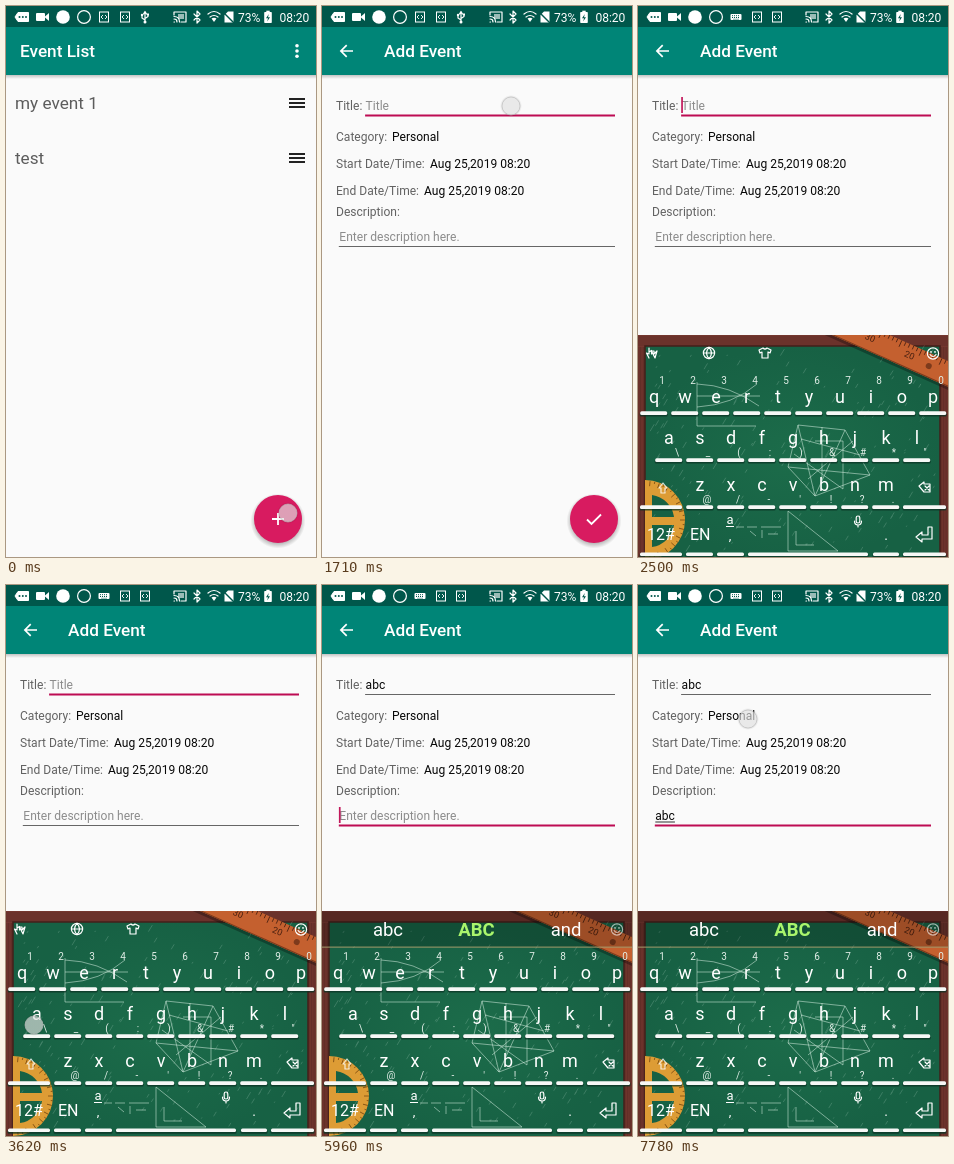
Animation of 310 by 551 pixels, one loop 8000 ms. Source, as an HTML page:

```html
<!DOCTYPE html>
<html lang="en">
<head>
<meta charset="utf-8">
<title>Event list</title>
<style>
html, body { margin: 0; width: 100%; height: 100%; overflow: hidden; background: #fafafa; }
svg { display: block; width: 100vw; height: 100vh; }
text { font-family: Roboto, "Noto Sans", sans-serif; white-space: pre; }
.line { fill: none; stroke: #fff; stroke-width: 1.2; stroke-linecap: round; stroke-linejoin: round; }
.chalk { fill: none; stroke: #d7eee2; stroke-width: .9; opacity: .6; }
#keys { --wood: #74372f; --edge: #431f1a; --ruler: #c4602f; --arc: #dd9c35; }
#keys.fade { --wood: #bb3264; --edge: #a04468; --ruler: #c23f74; --arc: #c23f74; }
</style>
</head>
<body>
<svg id="stage" viewBox="0 0 310 551">
  <defs>
    <linearGradient id="shade" x1="0" y1="0" x2="0" y2="1">
      <stop offset="0" stop-color="#000" stop-opacity=".22"/>
      <stop offset="1" stop-color="#000" stop-opacity="0"/>
    </linearGradient>
    <radialGradient id="board">
      <stop offset="0" stop-color="#1c6c4a"/>
      <stop offset="1" stop-color="#176144"/>
    </radialGradient>
    <radialGradient id="glow">
      <stop offset=".75" stop-color="#000" stop-opacity=".32"/>
      <stop offset="1" stop-color="#000" stop-opacity="0"/>
    </radialGradient>
    <clipPath id="keyClip"><rect y="326" width="310" height="225"/></clipPath>
  </defs>
  <g id="list"></g>
  <g id="form"></g>
  <g id="keys"></g>
  <g id="status"></g>
  <g id="dot">
    <circle r="11" fill="url(#glow)" opacity=".4"/>
    <circle r="9" fill="#f2f2f2" fill-opacity=".62" stroke="#bbb" stroke-opacity=".65"/>
  </g>
</svg>
<script>
const $ = id => document.getElementById(id);
const text = (x, y, s, size = 12.06, fill = '#626262', more = '') =>
  `<text x="${x}" y="${y}" font-size="${size}" fill="${fill}" ${more}>${s}</text>`;
const mid = (x, y, s, size, fill = '#fff', more = '') =>
  text(x, y, s, size, fill, 'text-anchor="middle" ' + more);
const rect = (x, y, w, h, fill, more = '') =>
  `<rect x="${x}" y="${y}" width="${w}" height="${h}" fill="${fill}" ${more}/>`;
const disc = (x, y, r, fill) => `<circle cx="${x}" cy="${y}" r="${r}" fill="${fill}"/>`;
const ring = r => `<circle r="${r}" class="line"/>`;
const path = (d, more = 'class="line"') => `<path d="${d}" ${more}/>`;
const at = (x, y, body, more = '') => `<g transform="translate(${x} ${y})" ${more}>${body}</g>`;
const range = n => [...Array(n).keys()];

function seeded(seed) {
  return () => (seed = (seed * 16807) % 2147483647) / 2147483647;
}

const appBar = (x, title) =>
  rect(0, 0, 310, 551, '#fafafa') + rect(0, 69, 310, 4, 'url(#shade)') +
  rect(0, 0, 310, 21, '#00574b') + rect(0, 21, 310, 48, '#008577') +
  text(x, 51, title, 17.2, '#fff', 'font-weight="500"');

const fab = icon => at(272, 513,
  `<circle cy="2" r="27.5" fill="url(#glow)"/>` + disc(0, 0, 24, '#d81b60') +
  path(icon, 'fill="none" stroke="#fff" stroke-width="1.8"'));

function drawList() {
  const row = (y, name) => text(9, y + 6, name, 17.2, '#5c5c5c') +
    [-5, -1, 3].map(d => rect(283, y + d, 16, 2, '#222')).join('');
  $('list').innerHTML = appBar(14, 'Event List') +
    [39.8, 45, 50.2].map(y => disc(291, y, 1.8, '#fff')).join('') +
    row(97, 'my event 1') + row(152, 'test') + fab('M-6 0H6M0-6V6');
}

function drawForm() {
  const pair = (y, label, x, value) => text(14, y, label) + text(x, y, value, 12.06, '#080808');
  const field = (id, x, y, hint) =>
    text(x, y, hint, 12.06, '#8c8c8c', `id="${id}Hint"`) +
    text(x, y, '', 12.06, '#080808', `id="${id}Text"`) +
    rect(x, y + 1.5, 0, 1, '#333', `id="${id}Mark"`) +
    rect(x - .5, y + 5, 293.5 - x, 1, '#666', `id="${id}Line"`);
  $('form').innerHTML = appBar(62, 'Add Event') +
    path('M31 45H19M24.7 39.2L18.9 45L24.7 50.8', 'fill="none" stroke="#fff" stroke-width="1.7"') +
    text(14, 104, 'Title:') + field('title', 43.6, 104, 'Title') +
    pair(135, 'Category:', 70, 'Personal') +
    pair(162, 'Start Date/Time:', 108, 'Aug 25,2019 08:20') +
    pair(189, 'End Date/Time:', 102, 'Aug 25,2019 08:20') +
    text(14, 210, 'Description:') + field('desc', 17.3, 235, 'Enter description here.') +
    rect(0, 0, 1.7, 16, '#c2185b', 'id="caret"') + fab('M-7 .5L-2.5 5L7-4.5');
}

function drawBoard() {
  const rnd = seeded(41);
  const dust = range(190).map(() => {
    const x = 12 + rnd() * 284, y = 342 + rnd() * 204, d = 1 + rnd() * 6;
    return `M${x.toFixed(1)} ${y.toFixed(1)}l${(d * .6).toFixed(1)} ${(-d).toFixed(1)}`;
  }).join('');
  const grain = range(5).map(i => `M0 ${328 + i * 2}H310M${1 + i * 1.5} 338V551M${302 + i * 1.7} 338V551`).join('');
  const ticks = range(30).map(i => `M${i * 4.4} 0v${i % 5 ? 4 : 7}`).join('');
  const ruler = `<g transform="translate(194 326) rotate(24)">` +
    rect(-20, 0, 170, 3, '#000', 'opacity=".3"') +
    rect(-20, -23.5, 170, 23.5, 'var(--ruler)') + rect(-20, -1, 170, 1, '#7d3a1c') +
    at(0, -23.5, path(ticks, 'stroke="#4a2010" stroke-width=".8"')) +
    mid(36, -10, '30', 9, '#4a2010') + mid(79, -10, '20', 9, '#4a2010') + disc(101, -11, 3, '#7d3a1c') + '</g>';
  const arc = path('M7 471A40 40 0 0 1 7 551ZM14 486V508H36A26 26 0 0 0 14 486ZM14 516V538A26 26 0 0 0 36 516Z',
    'fill="var(--arc)" fill-rule="evenodd"') +
    range(25).map(i => `<path d="M0-39V${i % 2 ? -37 : -34}" stroke="#7a4a10" stroke-width=".8" transform="translate(8 511) rotate(${6 + i * 7})"/>`).join('');
  const sketch = path('M59 373V417H118M59 375Q92 376 121 397M59 398Q95 396 119 375M59 387H122' +
    'M160 416L207 421L232 466L150 458ZM160 416L177 487L232 466M207 421L177 487L150 458M177 432H205V480' +
    'M163 430L222 446M156 445L205 480M170 470L215 432M184 418V470' +
    'M150 502V542H200ZM158 522V536H176M98 518h8m3 0h10m4 0h20M112 522l6 5m6-6v8m6-4h10', 'class="chalk"');
  return rect(0, 326, 310, 225, 'var(--wood)') +
    path(grain, 'stroke="var(--edge)" stroke-width=".7" opacity=".5"') +
    rect(7, 337, 295, 216, 'url(#board)', 'stroke="var(--edge)" stroke-width="1.5"') +
    path(dust, 'stroke="#cfe9dc" stroke-width=".8" opacity=".25"') + sketch + ruler + arc;
}

function drawKeys() {
  const bar = (x, y, w = 27) => rect(x - .5, y + 1, w + 1, 4.2, '#0b3324', 'rx="1.5" opacity=".75"') +
    rect(x, y, w, 3.6, '#f6f8f6', 'rx="1.5"');
  const row = (letters, small, x, y, dx, dy) => range(letters.length).map(i => {
    const cx = x + i * 31;
    return mid(cx, y, letters[i], 18) + mid(cx + dx, y + dy, small[i], 10, '#e2efe8') +
      bar(cx - 13.8, y + (dy < 0 ? 8.3 : 14.3));
  }).join('');
  const smile = at(295, 344.5, ring(5.6) +
    path('M-3 1Q0 5 3 1') + disc(-2, -1.6, .9, '#fff') + disc(2, -1.6, .9, '#fff'), 'id="smile"');
  const tools =
    at(14, 344, path('M-3 5L-5.5 0L-3 1V-5M-3-1L-.5-2.5V1M-.5-2L2-2V1L5-2L3 5Z')) +
    at(71, 344, ring(5.6) + path('M-5.6 0H5.6M0-5.6Q-5 0 0 5.6Q5 0 0-5.6')) +
    at(127, 344, path('M-2-5Q0-3 2-5L6-3L5 0L3-1V5H-3V-1L-5 0L-6-3Z'));
  const words = rect(0, 326, 310, 36, '#000', 'opacity=".2"') + rect(0, 361.6, 310, 1, '#a39a6a') +
    [66, 154.5, 244].map((x, i) => mid(x, 351, '', 18.5, '#fff', `id="word${i}"`)).join('');
  const low =
    text(9, 531, '12#', 16, '#fff') + text(52, 531, 'EN', 16, '#fff') +
    mid(92, 515, 'a', 13) + rect(88, 517, 8, 1, '#fff') + mid(92, 531, ',', 13) +
    at(220, 512, rect(-1.8, -5, 3.6, 7, 'none', 'rx="1.8" class="line"') + path('M-3.5 0Q-3.5 4 0 4Q3.5 4 3.5 0M0 4V6')) +
    mid(248, 531, '.', 14) +
    at(286, 526, path('M4-8H8V4H-2V7L-8 2L-2-3V0H4Z')) +
    [[2, 42], [48, 27], [79, 27], [110, 120], [235, 26], [265, 43]].map(([x, w]) => bar(x, 543.5, w)).join('');
  $('keys').innerHTML = `<g clip-path="url(#keyClip)">` + drawBoard() +
    `<g id="tools">${tools}</g><g id="words">${words}</g>` + smile +
    row('qwertyuiop', '1234567890', 16, 394, 8, -19) +
    row('asdfghjkl', ['\\', '_', '(', ':', ')', '&amp;', '#', '*', '"'], 31, 435, 8, 12) +
    row('zxcvbnm', "@/-'!?.", 62, 482, 7, 12) +
    at(25, 479, path('M0-5L4 0H2V5H-2V0H-4Z'), 'opacity=".8"') + bar(2, 496.3, 42) +
    at(287, 478, path('M-6-1L-1-5V-3H5V5H-1L-6-1M0-1L4 3M4-1L0 3')) + bar(265, 496.3, 43) + low + '</g>';
}

function drawStatus() {
  const page = x => at(x, 11, rect(-4.5, -5, 9, 10, 'none', 'stroke="#fff"') +
    path('M-1-2L-3 0L-1 2M1-2L3 0L1 2', 'fill="none" stroke="#fff" stroke-width=".9"'));
  const board = at(98, 11, rect(-5.5, -3, 11, 6, '#fff', 'rx="1"') +
    path('M-4-1.3H4M-4 .5H4M-2.5 2.2H2.5', 'stroke="#00574b" stroke-dasharray="1 1"'));
  const usb = at(139, 11, path('M0 5V-5M-1.5-3L0-5.5L1.5-3M0 3L-3 1V-1.5M0 1.5L3-.5V-2.5') +
    disc(0, 5, 1.5, '#fff') + disc(-3, -2, 1.2, '#fff') + rect(2, -3.5, 2, 2, '#fff'));
  $('status').innerHTML =
    at(16, 11, path('M-7 0L-4-4.5H6.5V4.5H-4Z', 'fill="#fff" stroke="#fff" stroke-linejoin="round"') +
      [-2.5, .8, 4].map(x => disc(x, 0, 1, '#00574b')).join('')) +
    at(36, 11, rect(-6, -4, 9, 8, '#fff', 'rx="1"') + path('M3-.5L7-4V4L3 .5Z', 'fill="#fff"')) +
    disc(57, 11, 6.8, '#fff') + at(78, 11, ring(6.4)) +
    `<g id="idle">${page(98) + page(119) + usb}</g><g id="typing">${board + page(119) + page(139)}</g>` +
    at(174, 11, path('M-6-2V-5H6V5H1M-6 5h.5M-6 2Q-3 2-3 5M-6-.5Q-.5-.5-.5 5') + rect(-2, -3, 6, 5, '#fff', 'opacity=".6"')) +
    at(191, 11, path('M-3-3L3 3L0 6V-6L3-3L-3 3')) +
    at(208, 11, path('M-6-3Q0-8 6-3M-4 0Q0-3 4 0') + path('M-2.5 1.5Q0 0 2.5 1.5L0 5Z', 'fill="#fff"')) +
    at(223, 11, path('M-1-5.5H4.5V5.5H-4.5V-2Z', 'fill="#fff"') + path('M-6-5L5 6', 'stroke="#00574b" stroke-width="1.4"')) +
    text(232, 15.5, '73%', 12.06, '#fff') +
    at(262, 11, rect(-1.7, -6.3, 3.4, 2, '#fff') + rect(-3.8, -5, 7.6, 11, '#fff', 'rx=".8"') +
      path('M.8-3L-2 1.2H0L-.8 4.4L2 .2H0Z', 'fill="#00574b"')) +
    text(273.4, 15.5, '08:20', 12.06, '#fff');
}

// Step tables: each row holds from its time until the next row.
const formSteps = [[0, 44, 0], [970, 43, .06], [1070, 34, .4], [1170, 11.5, .87], [1270, 2.5, 1], [1370, 0, 1]];
const keySteps = [[0, 225, 0], [2190, 130, .28], [2300, 53, .6], [2400, 16, .85], [2500, 3, 1], [2600, 0, 1]];
const titleSteps = [[0, ''], [4150, 'a'], [4920, 'ab'], [5320, 'abc']];
const descSteps = [[0, ''], [6380, 'a'], [6970, 'ab'], [7290, 'abc']];
const wordSteps = [[0, ''], [4250, 'a'], [5020, 'ab'], [5420, 'abc'], [6480, 'a'], [7070, 'ab'], [7390, 'abc']];
const caretOn = [[0, 1570], [1990, 3620], [4150, 4450], [4920, 5420], [5760, 6270], [6380, 6590], [6970, 7780]];
const A = [28, 440], B = [184, 488], C = [122, 488];
const touches = [
  [0, 860, 282, 507], [1710, 1990, 189, 100], [3620, 4150, ...A], [4760, 4920, ...B], [5120, 5320, ...C],
  [5660, 5860, 110, 231], [6270, 6380, ...A], [6870, 6970, ...B], [7170, 7290, ...C], [7780, 8000, 110, 134]
];

const step = (rows, t) => rows.filter(r => r[0] <= t).pop().slice(1);
const within = (rows, t) => rows.find(r => t >= r[0] && t < r[1]);
const show = (id, on) => $(id).setAttribute('display', on ? 'inline' : 'none');
const set = (id, attrs) => { for (const k in attrs) $(id).setAttribute(k, attrs[k]); };

function drawField(id, value, focus, y) {
  const node = $(id + 'Text');
  if (node.textContent !== value) node.textContent = value;
  show(id + 'Hint', !value);
  const width = value ? node.getComputedTextLength() : 0;
  set(id + 'Mark', { width: focus ? width : 0 });
  set(id + 'Line', { height: focus ? 2 : 1, fill: focus ? '#bd0b53' : '#666', y: focus ? y + 4.5 : y + 5 });
  if (focus) set('caret', { x: +node.getAttribute('x') - .4 + width, y: y - 13 });
}

function render(t) {
  const [drop, alpha] = step(formSteps, t);
  set('form', { transform: `translate(0 ${drop})`, opacity: alpha });
  const [slide, solid] = step(keySteps, t);
  set('keys', { transform: `translate(0 ${slide})`, opacity: solid, class: solid < .8 ? 'fade' : '' });

  const inDesc = t >= 5760;
  drawField('title', step(titleSteps, t)[0], !inDesc, 104);
  drawField('desc', step(descSteps, t)[0], inDesc, 235);
  show('caret', within(caretOn, t));

  const [word] = step(wordSteps, t);
  show('tools', !word);
  show('words', word);
  set('smile', { opacity: word ? .6 : 1 });
  const single = word === 'a';
  [single ? 'A' : word, single ? 'a' : word.toUpperCase(), 'and'].forEach((s, i) => {
    if ($('word' + i).textContent !== s) $('word' + i).textContent = s;
  });
  set('word1', { fill: single ? '#d0c852' : '#a9f56c', 'font-weight': 700 });

  show('idle', t < 1990);
  show('typing', t >= 1990);
  const touch = within(touches, t);
  show('dot', touch);
  if (touch) set('dot', { transform: `translate(${touch[2]} ${touch[3]})` });
}

drawList();
drawForm();
drawKeys();
drawStatus();
const start = performance.now();
function tick() {
  render((performance.now() - start) % 8000);
  requestAnimationFrame(tick);
}
tick();
</script>
</body>
</html>
```
